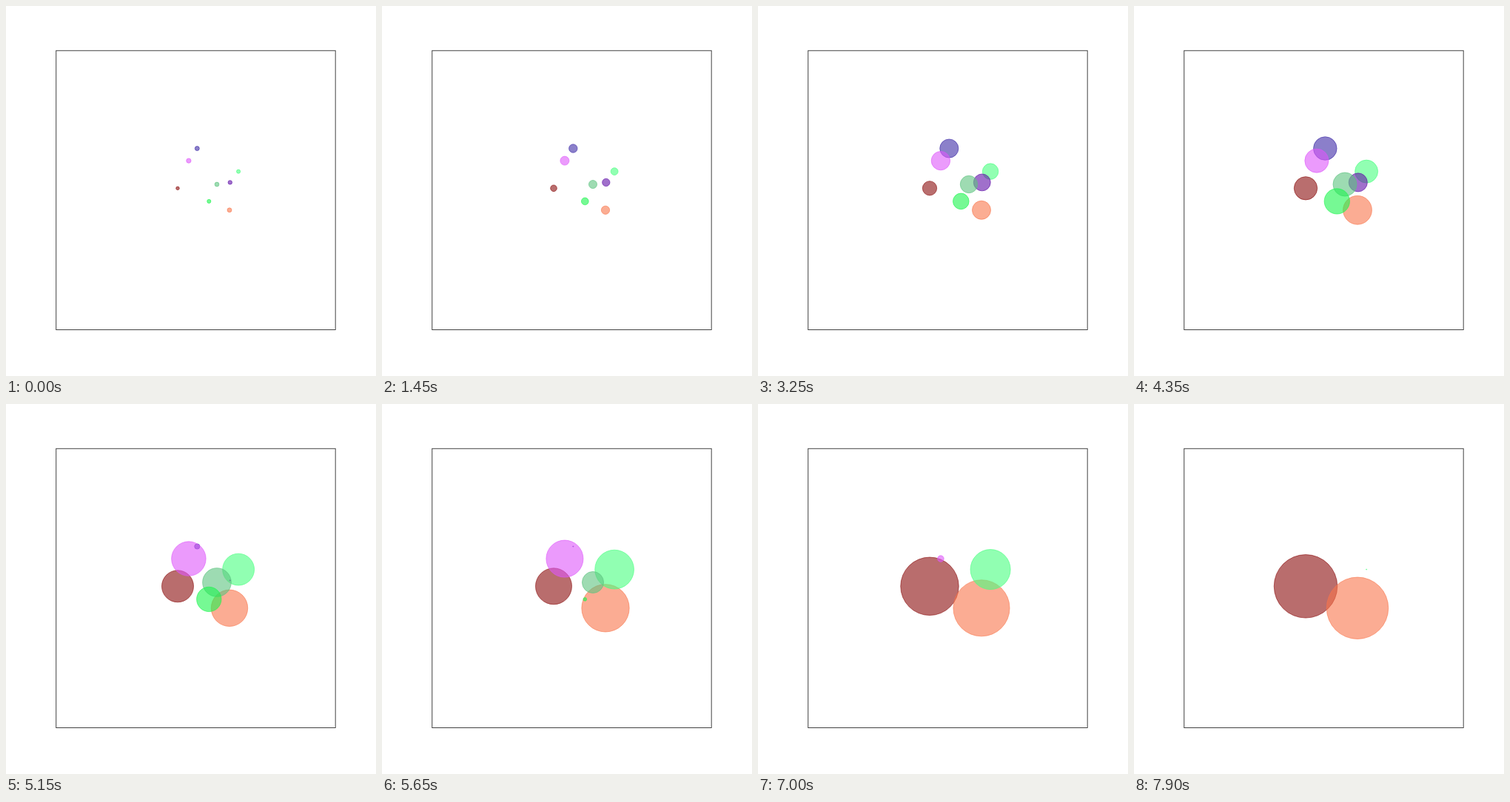
Write an HTML page that moves like this. It is 500 px wide and 500 px high and loops after 8 s.

```html
<!DOCTYPE html>
<html lang="en">
<head>
<meta charset="utf-8">
<title>Competing circles</title>
<style>
  html, body { margin: 0; width: 100%; height: 100%; overflow: hidden; background: #fff; }
  svg { display: block; width: 100vw; height: 100vh; }
  rect { fill: none; stroke: #444; }
  circle { fill-opacity: 0.6; stroke-opacity: 0.6; stroke-width: 1; }
</style>
</head>
<body>
<svg id="stage" viewBox="0 0 500 500">
  <rect x="67.7" y="60.3" width="377.5" height="377.2"/>
</svg>
<script>
const LOOP = 8000, STEP = 50;
const GROWTH = 0.445, PRESSURE = 0.016;

// seed: first radius, cap: largest radius, fall: second at which the circle
// has lost half its size, fade: how gradually it does so.
const circles = [
  { x: 258.3, y: 192.5, color: 'rgb(62,43,167)', seed: 2.99, cap: 30, fall: 4.7, fade: 0.25 },
  { x: 232, y: 246.3, color: 'rgb(138,13,13)', seed: 2.27, cap: 44, fall: Infinity, fade: 1 },
  { x: 246.9, y: 209.1, color: 'rgb(222,88,250)', seed: 3.15, cap: 27, fall: 6.75, fade: 0.15 },
  { x: 302, y: 275.8, color: 'rgb(248,118,75)', seed: 2.95, cap: 46, fall: Infinity, fade: 1 },
  { x: 314.1, y: 223.6, color: 'rgb(72,255,127)', seed: 2.59, cap: 34, fall: 7.28, fade: 0.15 },
  { x: 302.8, y: 238.4, color: 'rgb(97,17,168)', seed: 2.71, cap: 30, fall: 4.5, fade: 0.185 },
  { x: 285, y: 241, color: 'rgb(93,195,127)', seed: 2.9, cap: 28, fall: 5.7, fade: 0.2 },
  { x: 274.3, y: 263.9, color: 'rgb(27,245,77)', seed: 2.55, cap: 30, fall: 5.3, fade: 0.15 }
];

const stage = document.getElementById('stage');
for (const c of circles) {
  c.node = document.createElementNS(stage.namespaceURI, 'circle');
  const attributes = { cx: c.x, cy: c.y, fill: c.color, stroke: c.color };
  for (const name in attributes) c.node.setAttribute(name, attributes[name]);
  stage.append(c.node);
}

// Exponential growth that levels off at the cap and then dies away.
function freeRadius({ seed, cap, fall, fade }, t) {
  const grown = seed * Math.exp(GROWTH * t);
  const capped = grown / (1 + (grown / cap) ** 4) ** 0.25;
  return capped / (1 + Math.exp((t - fall) / fade));
}

// A circle gives way to the rival it overlaps most, until it outlives it.
function squeeze(c, t) {
  const overlaps = circles
    .filter(rival => rival.fall < c.fall)
    .map(rival => freeRadius(c, t) + freeRadius(rival, t) - Math.hypot(c.x - rival.x, c.y - rival.y));
  return PRESSURE * Math.max(0, ...overlaps) ** 2;
}

function draw(ms) {
  const tick = Math.floor(ms % LOOP / STEP) * STEP;
  const t = tick < 2 * STEP ? 0 : tick / 1000;
  for (const c of circles) {
    const r = freeRadius(c, t) - squeeze(c, t);
    c.node.setAttribute('r', Math.max(0, r));
    c.node.style.display = r > 0.3 ? '' : 'none';
  }
}

const start = performance.now();
function frame() {
  draw(performance.now() - start);
  requestAnimationFrame(frame);
}
frame();
</script>
</body>
</html>
```
